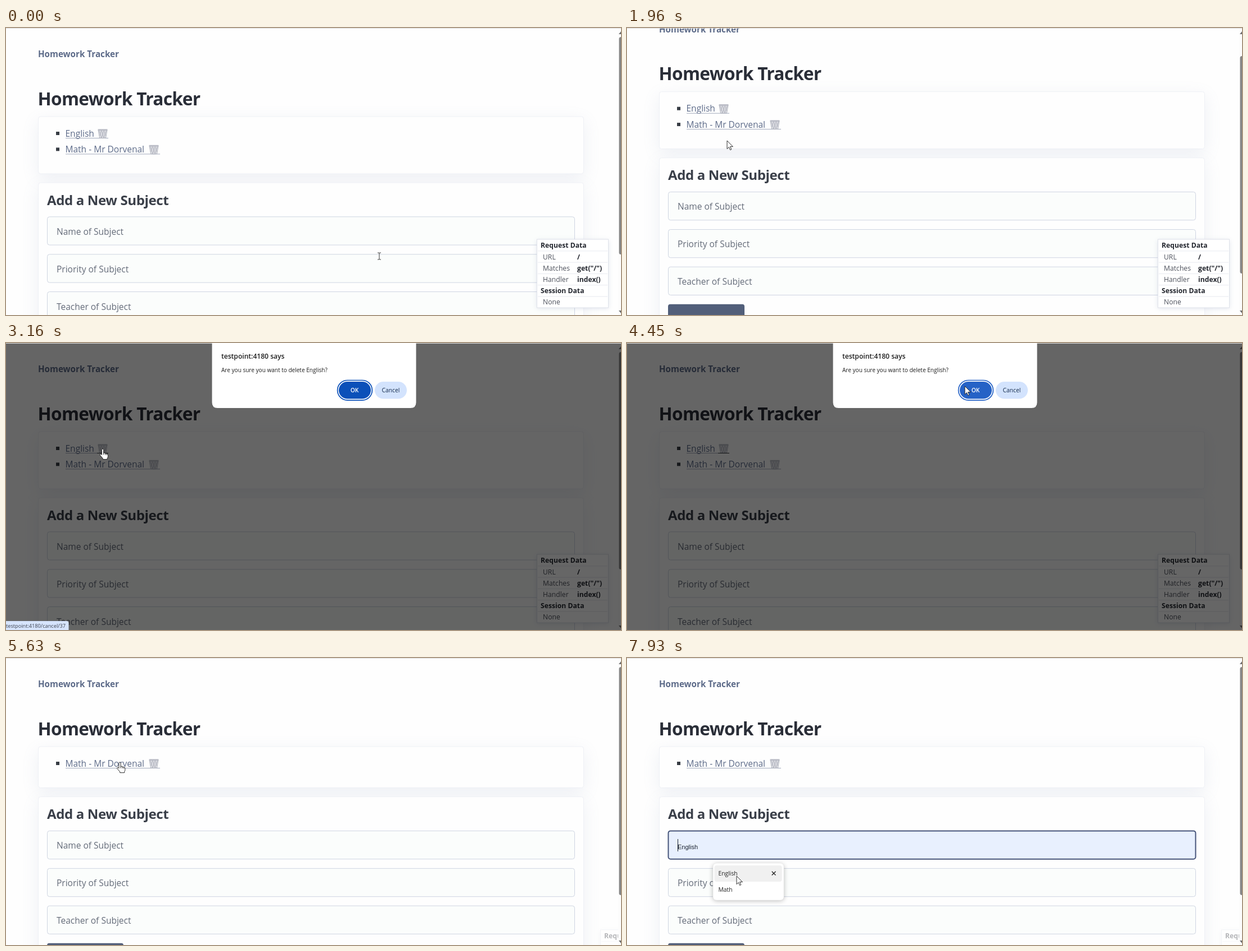
Write an HTML page that moves like this. It is 1094 px wide and 512 px high and loops after 8000 ms.

```html
<!DOCTYPE html>
<html lang="en">
<head>
<meta charset="utf-8">
<title>Homework Tracker</title>
<style>
html, body { margin: 0; width: 100%; height: 100%; overflow: hidden; background: #fefefe; }
svg { display: block; width: 100%; height: 100%; font-family: "Open Sans", "Noto Sans", sans-serif; }
text { white-space: pre; }
.b { font-weight: 700; }
.h1 { font-size: 31.6px; letter-spacing: -.65px; fill: #2a2e38; }
.h2 { font-size: 24px; letter-spacing: -.35px; fill: #3a3f49; }
.nav { font-size: 15.2px; fill: #5d6b89; }
.link { font-size: 15.5px; fill: #5d6b89; }
.hint { font-size: 15.5px; fill: #646b79; }
.btn { font-size: 15.5px; fill: #fff; }
.info { font-size: 12.2px; fill: #4d515c; }
.info .b { fill: #24272f; }
.ui { font-size: 10.3px; fill: #1f1f1f; }
.mid { text-anchor: middle; }
.field { fill: #fbfdfc; stroke: #cfd5e2; }
.line { fill: #a2aabc; }
</style>
</head>
<body>
<svg id="stage" viewBox="0 0 1094 512" preserveAspectRatio="none"></svg>
<script>
const LOOP = 8000, ROW = 28.4, SCROLL = 123;
const stage = document.getElementById('stage');

const text = (x, y, cls, s, extra = '') => `<text x="${x}" y="${y}" class="${cls}" ${extra}>${s}</text>`;
const rect = (x, y, w, h, extra = '') => `<rect x="${x}" y="${y}" width="${w}" height="${h}" ${extra}/>`;

const card = (id, y, h) =>
  rect(57, y + 8, 971, h, `id="${id}Shade" rx="4" fill="#8191b5" opacity=".13" filter="url(#soft)"`) +
  rect(57.5, y, 970, h, `id="${id}" rx="4" fill="#fefefe" stroke="#eff1f6"`);

const field = (y, hint, id) =>
  rect(73.5, y, 938, 50.3, `class="field" rx="4" id="${id}"`) +
  text(90, y + 32, 'hint', hint, `id="${id}Hint"`);

const bin = x => `<g transform="translate(${x} 179)">
  <path d="M1 3L3.4 17Q9 18.4 14.6 17L17 3Z" fill="#dcdde3" stroke="#a9acb6" stroke-width=".8"/>
  <path d="M2.5 4L7 17M7 4L11 17M11.5 4L14 13M15.5 4L11 17M11 4L7 17M6.5 4L4 13" fill="none" stroke="#a4a7b2" stroke-width=".7"/>
  <path d="M.6 1.4H17.4V4H.6Z" fill="#b9bbc5"/></g>`;

const item = (label, binX, end) =>
  rect(89, 185, 6, 6, 'fill="#373c44"') + text(105.5, 193.5, 'link', label) +
  rect(106, 196, end - 106, 1, 'class="line"') + bin(binX);

const infoRows = [['URL', '/'], ['Matches', 'get("/")'], ['Handler', 'index()']];
const panel = () => {
  let s = rect(944.5, 379, 127, 121, 'fill="#8191b5" opacity=".25" filter="url(#soft2)"') +
    rect(944.5, 377, 127, 122, 'fill="#fff" stroke="#dfe2ea"');
  for (let i = 1; i < 6; i++) s += rect(946, 377 + i * 20.3, 124, 1, 'fill="#e8eaf0"');
  s += text(951, 392, 'b', 'Request Data') + text(951, 473, 'b', 'Session Data') + text(955, 493.3, '', 'None');
  infoRows.forEach(([k, v], i) => {
    const y = 412.5 + i * 20.2;
    s += text(955, y, '', k) + text(1016, y, 'b', v);
  });
  return s;
};

stage.innerHTML = `
<defs>
  <filter id="soft" filterUnits="userSpaceOnUse" x="-40" y="60" width="1174" height="680"><feGaussianBlur stdDeviation="15"/></filter>
  <filter id="soft2" x="-20%" y="-20%" width="140%" height="140%"><feGaussianBlur stdDeviation="4"/></filter>
</defs>
${rect(0, 0, 1094, 512, 'fill="#fefefe"')}
<g id="page">
  ${text(57, 52, 'b nav', 'Homework Tracker')}
  ${text(56.5, 137.5, 'b h1', 'Homework Tracker')}
  ${card('list', 158, 102)}
  <g id="first">${item('English', 163, 182)}${rect(162, 196, 20, 1, 'id="hot" fill="#2d3138"')}</g>
  <g id="second">${item('Math - Mr Dorvenal', 254, 274)}</g>
  <g id="form">
    ${card('formCard', 276, 327.5)}
    ${text(73, 315.5, 'b h2', 'Add a New Subject')}
    ${field(336.8, 'Name of Subject', 'subject')}
    ${text(90, 369, '', 'English', 'id="preview" font-size="11" fill="#1c2430" font-family="Liberation Sans, sans-serif"')}
    ${rect(90, 351.4, 1, 22, 'id="caret" fill="#1c2430"')}
    ${field(403.8, 'Priority of Subject', 'priority')}
    ${field(470.5, 'Teacher of Subject', 'teacher')}
    ${rect(73, 537.2, 136, 50, 'rx="4" fill="#525f7a"')}
    ${text(141, 568.5, 'btn mid', 'Add the Thing')}
  </g>
</g>
<g id="panel" class="info">${panel()}</g>
${rect(1089, 0, 5, 512, 'fill="#fcfcfc"')}
${rect(1090.5, 16, 8, 388, 'id="thumb" rx="3.5" fill="#858585"')}
<path d="M1090 11L1094 6V11ZM1090 504H1094V509Z" fill="#6b6b6b"/>
<g id="popup">
  ${rect(153, 368, 126, 65, 'rx="6" fill="#000" opacity=".28" filter="url(#soft2)"')}
  ${rect(153, 366, 126, 66, 'rx="6" fill="#fff" stroke="#e6e6e6" stroke-width=".6"')}
  <g id="pick">${rect(155.5, 370, 120, 29, 'rx="4" fill="#f0f0f0"')}
    <path d="M257.7 380.7L264.5 387.5M264.5 380.7L257.7 387.5" stroke="#222" stroke-width="1.3"/></g>
  ${text(162.5, 388, 'ui', 'English', 'font-weight="500"')}
  ${text(162.5, 417, 'ui', 'Math', 'font-weight="500"')}
</g>
${rect(0, 0, 1094, 512, 'id="dim" fill="#000"')}
${rect(0, 0, 1094, 1, 'fill="#dedede"')}
<g id="dialog">
  <path d="M366.5 0H729.5V106Q729.5 116 719.5 116H376.5Q366.5 116 366.5 106Z" fill="#fff"/>
  ${text(383, 28, 'ui', 'testpoint:4180 says', 'font-weight="600" style="font-size:12.1px"')}
  ${text(383, 52, 'ui', 'Are you sure you want to delete English?', 'style="font-size:10.05px"')}
  ${rect(589.6, 66.5, 61.8, 35.6, 'id="ring" rx="17.8" fill="#fff" stroke-width="1.7"')}
  ${rect(592, 69, 57, 30.6, 'id="ok" rx="15.3"')}
  ${text(620, 88, 'ui mid', 'OK', 'font-weight="600" style="fill:#fff"')}
  ${rect(656, 69, 57, 30.6, 'rx="15.3" fill="#d3e3fd"')}
  ${text(684.5, 88, 'ui mid', 'Cancel', 'font-weight="500" style="fill:#13294b"')}
</g>
<g id="status">
  <path d="M0 496H108Q111.5 496 111.5 499.5V512H0Z" fill="#d6e4fc"/>
  ${text(0, 508, 'ui', 'testpoint:4180/cancel/37', 'style="font-size:9.2px;fill:#3c4250"')}
</g>
<g id="cursor">
  <path id="arrow" d="M0 0V14.6L3.4 11.5L5.6 16.6L7.8 15.6L5.6 10.6H10.4Z" fill="#fff" stroke="#1a1a1a" stroke-width=".9"/>
  <path id="beam" d="M-3-6H-1Q0-6 0-5Q0-6 1-6H3M0-5V5M-3 6H-1Q0 6 0 5Q0 6 1 6H3" fill="none" stroke="#3a3a3a"/>
  <path id="hand" d="M-1.6 1.6a1.6 1.6 0 0 1 3.2 0V7.2q3-.6 3 .8q2.6-.4 2.6 1q2.2-.2 2.2 1.6V13.3q0 2-1.3 3.4V18.5H.2V16.8L-4.6 11.2q-.8-2 1-2.2L-1.6 10.6ZM1.6 7.2V10.5M4.6 8V10.8M7.2 9V11.2" fill="#fff" stroke="#1a1a1a" stroke-width=".9" stroke-linejoin="round"/>
</g>`;

const el = {};
stage.querySelectorAll('[id]').forEach(n => el[n.id] = n);
const set = (id, o) => { for (const k in o) el[id].setAttribute(k, o[k]); };
const show = (id, on) => set(id, { opacity: +on });
const move = (id, x, y) => set(id, { transform: `translate(${x} ${y})` });

const ramp = (t, a, b) => Math.min(1, Math.max(0, (t - a) / (b - a)));
const ease = (t, a, b) => { const u = ramp(t, a, b); return u * u * (3 - 2 * u); };
const during = (t, a, b) => t >= a && t < b;

// time, x, y
const path = [
  [0, 664, 407], [60, 664, 407], [250, 400, 372], [400, 150, 275], [480, 76, 228], [540, 90, 212],
  [1260, 90, 212], [1430, 125, 228], [1630, 178, 201],
  [2400, 178, 201], [2570, 166, 195], [2710, 172, 189],
  [3520, 172, 189], [3900, 350, 132], [4310, 601, 77],
  [5230, 601, 77], [5630, 203, 186], [6030, 165, 183], [6420, 168, 300], [6720, 168, 338],
  [7410, 168, 338], [7700, 182, 368], [7930, 195, 389], [8000, 195, 389]
];
const kinds = [
  [0, 'beam'], [330, 'arrow'], [1350, 'beam'], [1540, 'arrow'], [2600, 'hand'], [3600, 'arrow'],
  [5590, 'hand'], [5760, 'arrow'], [6450, 'beam'], [7680, 'arrow']
];

const still = (a, b) => a[1] === b[1] && a[2] === b[2];
function slope(i, k) {
  const a = path[i - 1], p = path[i], b = path[i + 1];
  if (!a || !b || still(a, p) || still(p, b)) return 0;
  return (b[k] - a[k]) / (b[0] - a[0]);
}
function pointer(t) {
  let i = 0;
  while (i < path.length - 2 && t >= path[i + 1][0]) i++;
  const a = path[i], b = path[i + 1], d = b[0] - a[0], u = ramp(t, a[0], b[0]), v = 1 - u;
  return [1, 2].map(k =>
    a[k] * (1 + 2 * u) * v * v + b[k] * u * u * (3 - 2 * u) +
    d * u * v * (slope(i, k) * v - slope(i + 1, k) * u));
}

function draw(t) {
  const scroll = ease(t, 770, 1010) - ease(t, 1860, 2030);
  const gone = t >= 4600, up = gone ? -ROW : 0;

  move('page', 0, -SCROLL * scroll);
  show('first', !gone);
  show('hot', during(t, 2600, 4600));
  move('second', 0, ROW + up);
  move('form', 0, up);
  set('list', { height: 102 + up });
  set('listShade', { height: 102 + up });
  set('thumb', { y: 16 + 94 * scroll, height: gone ? 407 : 388 });

  const slide = ease(t, 5250, 5570);
  move('panel', 113 * slide, 108 * slide);
  set('panel', { opacity: 1 - .67 * slide });

  const focus = ease(t, 6750, 6970), filled = t >= 7680;
  el.subject.style.stroke = `color-mix(in srgb, #47557a ${focus * 100}%, #cfd5e2)`;
  el.subject.style.strokeWidth = 1 + focus;
  el.subject.style.fill = filled ? '#e8f0fe' : '#fbfdfc';
  show('subjectHint', !filled);
  show('preview', filled);
  show('caret', t >= 6760 && Math.floor((t - 6760) / 500) % 2 === 0);
  set('popup', { opacity: ramp(t, 6820, 6890) });
  show('pick', filled);

  const modal = ease(t, 2990, 3150) - ease(t, 4460, 4590);
  const blue = t >= 4270 ? '#2562c6' : '#0b50b9';
  set('dim', { opacity: .6 * modal });
  set('dialog', { opacity: modal });
  set('ok', { fill: blue });
  set('ring', { stroke: blue });
  set('status', { opacity: ramp(t, 2880, 3000) - ramp(t, 3540, 3640) });

  const kind = kinds.filter(k => k[0] <= t).pop()[1];
  ['arrow', 'beam', 'hand'].forEach(k => show(k, k === kind));
  move('cursor', ...pointer(t));
}

function tick() {
  draw(performance.now() % LOOP);
  requestAnimationFrame(tick);
}
tick();
</script>
</body>
</html>
```
